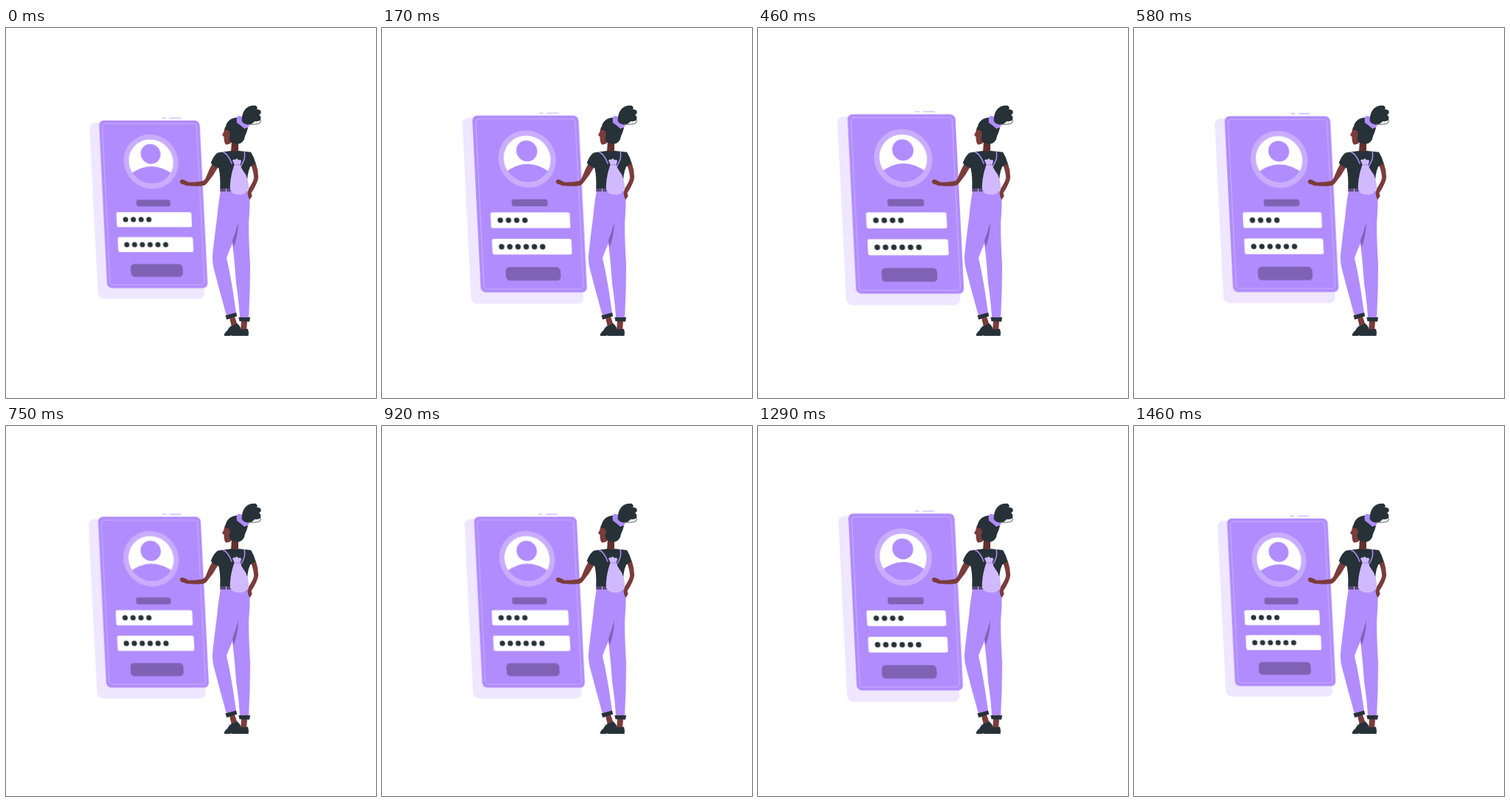
An HTML page that plays this animation: 500x500 px, repeating every 1500 ms.

```html
<!DOCTYPE html>
<html lang="en">
<head>
<meta charset="utf-8">
<title>Login card</title>
<style>
  html, body { margin: 0; width: 100%; height: 100%; overflow: hidden; background: #fff; }
  svg { display: block; width: 100vw; height: 100vh; }
  #card { transform-origin: 192.7px 243.4px; }
  .main { fill: #b18cff; }
  .deep { fill: #7e62b3; }
  .dark { fill: #263238; }
  .skin { fill: #7a3c3a; }
  .shade { fill: #63302e; }
  .white { fill: #fff; }
  .line { fill: none; stroke-linecap: round; }
</style>
</head>
<body>
<svg viewBox="0 0 500 500">
  <defs>
    <clipPath id="face"><circle cx="187" cy="180.6" r="30"/></clipPath>
  </defs>

  <g id="card">
    <g transform="skewX(2.85)">
      <rect x="106.9" y="128.6" width="142.8" height="236.7" rx="7" fill="#efe7ff" stroke="#e3d5ff" stroke-width=".5"/>
      <path d="M205.4 121.8h4.6M215.5 121.8h14" class="line" stroke="#c4a8ff" stroke-width="1.1"/>
      <rect x="119.3" y="125" width="136" height="226.4" rx="6.5" class="main"/>
      <rect x="123.6" y="129.2" width="127.4" height="217.8" rx="4" class="line" stroke="#d8c6ff" stroke-width=".6"/>
      <circle cx="187" cy="180.6" r="36.8" fill="#c8adff"/>
      <circle cx="187" cy="180.6" r="30" class="white"/>
      <g clip-path="url(#face)" class="main">
        <circle cx="187" cy="170.2" r="13.4"/>
        <path d="M152 203Q187 171 222 203V220H152Z"/>
      </g>
      <rect x="164.4" y="232" width="46" height="9" rx="3" class="deep"/>
      <rect x="136.6" y="248.8" width="101.4" height="20.2" rx="2.5" class="white"/>
      <rect x="136.8" y="282.6" width="101.6" height="20.2" rx="2.5" class="white"/>
      <g id="dots" class="dark"></g>
      <rect x="152.4" y="319" width="70.2" height="17.2" rx="5" class="deep"/>
    </g>
  </g>

  <g id="woman">
    <!-- feet -->
    <path class="skin" d="M302 392L309 390L313 402L305 404ZM318 396H326L325 409H317Z"/>
    <path class="dark" d="M294.5 415.5Q295 412 299 409Q302 403 306 402Q309 402 312 399Q315 401 317.5 406L314 409Q307 414 303 416H296Z"/>
    <path class="dark" d="M304.5 416Q305 413 310 411Q314 407 317.5 406.5Q322 408 327 406.5Q328.5 412 327.5 416Z"/>
    <path class="line" stroke="#d0b9ff" stroke-width=".8" d="M299.5 405Q300 402 303 402"/>

    <!-- trousers -->
    <path class="main" d="M290 220H329.5Q330 240 328 264Q328 290 330 320Q330 355 328 392H316Q315 372 311 345Q309 316 306 291Q301 302 298 311Q305 340 311 386L298 389Q290 360 281 326Q278 314 279.500 303Q283 272 285 258Q287 236 290 220Z"/>
    <path class="deep" d="M314 263Q309 279 306 287L307.500 296.500Q313 283 314 263Z"/>
    <path class="dark" d="M296.500 388.500L311 384.500L312.300 389.500L298.200 394ZM314.300 391H330L329 396.800L315.500 396.300Z"/>

    <!-- right arm, neck and face -->
    <path class="skin" d="M331 185L337.500 182Q341 192 341 202Q340 210 331.500 223L332.500 227L329.500 232Q327 229 326.500 223L328 217Q334 208 335 203Q335 195 331 185Z"/>
    <path class="shade" d="M305 153H314V167Q309 170 304 167Z"/>
    <path class="skin" d="M296 134Q294.500 138 294.500 140L292 144.800L294.500 147Q294.500 155 297 157.500Q301 158 306 154L309 137Z"/>

    <!-- hair -->
    <path class="dark" d="M296 138Q297 123 311 121Q320 122 327 135Q325 142 323 146Q322 154 315 156.500Q306 157 302 152Q301 147 303 143Q302 137 296 138Z"/>
    <path class="main" d="M313 119Q316 118 319 120Q322 128 329 131Q328 135 322 136Q318 132 312 128Q311 122 313 119Z"/>
    <path class="dark" d="M318.500 125Q319 114 324 109Q329 104 337 104.800Q341 107 339 110Q344 110 344.500 113Q345 116 342 117Q346 121 343 125Q339 127 336 126Q332 131 326 130.500Q320 129.500 318.500 125Z"/>
    <path class="line" stroke="#263238" stroke-width=".8" d="M329 130Q338 131 343 128.500Q345 126 343.500 122"/>

    <!-- left arm -->
    <path class="skin" d="M279 183Q274 192 271 200Q269 206 265 207Q255 208.500 247 208.500L240 205Q237 204 235.500 206Q234.500 210 237 210.500L244 213Q256 214 264 213.500Q270 213 273 208Q280 200 286 189Z"/>

    <!-- shirt and belt -->
    <path class="dark" d="M293 167.500L304 166Q309 167.500 315 166L331 167.800Q335 174 337.300 182.500L330 187.500Q325 198 326 217H289.300Q290 201 287.500 189.500Q282 188 276.800 182.500Q280 173 286 168.500Z"/>
    <path fill="#594b78" d="M289.300 216.800H312V221H289.300Z"/>
    <path stroke="#d0b9ff" stroke-width="1" d="M297.500 216.800V221"/>

    <!-- bag -->
    <path class="line" stroke="#b18cff" stroke-width="1.500" d="M293.500 167.800Q300 170 305 183M322.300 167.300Q324 178 317 187"/>
    <path fill="#d0b9ff" d="M308.500 185H316.500Q318 190 324 198Q328 208 328 216Q326 223 319 225Q311 226 305 222Q302 219 303 210Q304 197 308.500 185Z"/>
    <path fill="#d0b9ff" d="M306 179Q308 176.500 310 178Q312 175 314 178.500Q317 177 318 179.500Q318 182 316 185H309Z"/>
    <path class="line" stroke="#b18cff" stroke-width="1.300" d="M308.500 184.800H316.300"/>
  </g>
</svg>
<script>
  const dots = document.getElementById("dots");
  const addDots = (count, y) => {
    for (let i = 0; i < count; i++) {
      const dot = document.createElementNS("http://www.w3.org/2000/svg", "circle");
      dot.setAttribute("cx", 148.7 + i * 10.5);
      dot.setAttribute("cy", y);
      dot.setAttribute("r", 3.5);
      dots.append(dot);
    }
  };
  addDots(4, 258.9);
  addDots(6, 292.8);

  // Two heartbeats per loop: [time in ms, scale]
  const LOOP = 1500;
  const beats = [[0, 1], [300, 1.1], [858, 1], [1158, 1.1], [1458, 1], [LOOP, 1]];
  document.getElementById("card").animate(
    beats.map(([ms, s]) => ({ offset: ms / LOOP, transform: `scale(${s})` })),
    // The small lead keeps each step on its rounded start time
    { duration: LOOP, iterations: Infinity, easing: "steps(36)", delay: -5 }
  );
</script>
</body>
</html>
```
